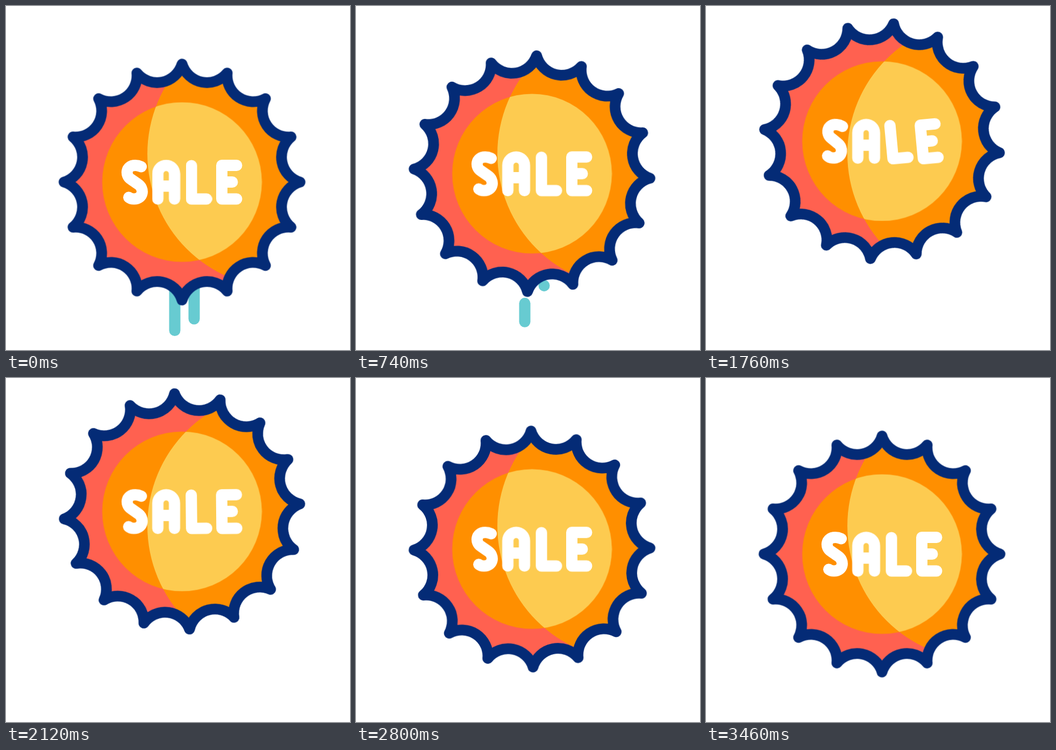
These frames come from a looping animation (640x640 px, 3600 ms). An HTML page:

```html
<!DOCTYPE html>
<html lang="en">
<head>
<meta charset="utf-8">
<title>Sale badge</title>
<style>
  html, body { margin: 0; width: 100%; height: 100%; overflow: hidden; background: #fff; }
  svg { display: block; width: 100vw; height: 100vh; }

  .coral { fill: #ff6150; }
  .orange { fill: #ff8f00; }
  .yellow { fill: #fdcb50; }
  .rim { fill: none; stroke: #042b76; stroke-width: 20; stroke-linejoin: round; }
  .text { fill: none; stroke: #fff; stroke-width: 21; stroke-linecap: round; stroke-linejoin: round; }
  .trail { fill: none; stroke: #67cbd1; stroke-width: 21; stroke-linecap: round; visibility: hidden; }

  .lift, .spin, .tilt, .trail { animation: 3600ms linear infinite; }
  .lift { animation-name: lift; }
  .spin { animation-name: spin; }
  .tilt { animation-name: tilt; }
  .long { animation-name: long; }
  .short { animation-name: short; }

  @keyframes lift {
    0% { transform: translateY(0); animation-timing-function: ease-in-out; }
    12.5% { transform: translateY(24px); animation-timing-function: cubic-bezier(.42, 0, .5, 1); }
    31.67% { transform: translateY(-72.5px); }
    56.94% { transform: translateY(-77.7px); animation-timing-function: ease-in-out; }
    63.89% { transform: translateY(-87px); animation-timing-function: cubic-bezier(.333, 0, .667, .333); }
    78.61% { transform: translateY(0); animation-timing-function: cubic-bezier(.333, .667, .667, 1); }
    80.28% { transform: translateY(10px); animation-timing-function: ease-in-out; }
    96.2%, 100% { transform: translateY(0); }
  }
  @keyframes spin {
    0%, 15.56% { transform: rotate(0deg); animation-timing-function: cubic-bezier(.333, 0, .667, .18); }
    20.56% { transform: rotate(2.2deg); animation-timing-function: cubic-bezier(.333, .19, .667, .727); }
    36.67% { transform: rotate(32.6deg); }
    48.89% { transform: rotate(50.6deg); }
    68.33% { transform: rotate(76.3deg); animation-timing-function: cubic-bezier(.333, .34, .667, .9); }
    77.78% { transform: rotate(89.5deg); animation-timing-function: ease-out; }
    80.56%, 100% { transform: rotate(90deg); }
  }
  @keyframes tilt {
    0%, 25% { transform: rotate(0deg); animation-timing-function: ease-in-out; }
    36.67% { transform: rotate(var(--tilt)); animation-timing-function: ease-in-out; }
    63.89%, 100% { transform: rotate(0deg); }
  }
  @keyframes long {
    0% { visibility: hidden; }
    17.2%, 17.22% { visibility: visible; stroke-dasharray: 0 300; stroke-dashoffset: 0; }
    20.56% { stroke-dasharray: 34 300; stroke-dashoffset: -33.5; }
    21.94% { stroke-dasharray: 30 300; stroke-dashoffset: -52; }
    24.44% { visibility: visible; stroke-dasharray: 0 300; stroke-dashoffset: -82; }
    24.45%, 100% { visibility: hidden; stroke-dashoffset: -82; stroke-dasharray: 0 300; }
  }
  @keyframes short {
    0% { visibility: hidden; }
    20.2%, 20.56% { visibility: visible; stroke-dasharray: 0 300; stroke-dashoffset: 0; }
    24% { stroke-dasharray: 35 300; stroke-dashoffset: -25; }
    26.67% { visibility: visible; stroke-dasharray: 0 300; stroke-dashoffset: -60; }
    26.68%, 100% { visibility: hidden; stroke-dashoffset: -60; stroke-dasharray: 0 300; }
  }
</style>
</head>
<body>
<svg viewBox="-327.5 -327.5 640 640" role="img" aria-label="SALE">
  <defs>
    <path id="star"/>
    <circle id="disc" r="148.5"/>
    <clipPath id="light"><circle cx="185.5" cy="-52.5" r="250"/></clipPath>
  </defs>

  <path class="trail long" d="M-13.5 192v84"/>
  <path class="trail short" d="M22.5 192.5v62"/>

  <g class="lift">
    <use href="#star" class="spin coral"/>
    <use href="#disc" class="orange"/>
  </g>
  <g clip-path="url(#light)">
    <g class="lift">
      <use href="#star" class="spin orange"/>
      <use href="#disc" class="yellow"/>
    </g>
  </g>
  <g class="lift">
    <use href="#star" class="spin rim"/>
    <g class="text">
      <g transform="translate(-87.5 .5)"><path class="tilt" style="--tilt:8deg" d="M11.5-29Q6-31.5 .5-31.5C-18-31.5-18-12-8-6L5 3C18 11 16 31-2 31Q-8 31-11.5 28"/></g>
      <g transform="translate(-29.5 .5)"><path d="M-15.5 31V-16A15.5 15.5 0 0 1 15.5-16V31M-15.5 7H15.5"/></g>
      <g transform="translate(32 .5)"><path class="tilt" style="--tilt:-9deg" d="M-14.5-31V31H13.5"/></g>
      <g transform="translate(87.5 .5)"><path class="tilt" style="--tilt:-9deg" d="M14-31.5H-13.5V31H14M-13.5-.5H6"/></g>
    </g>
  </g>
</svg>
<script>
  // Sixteen tips joined by arcs that curve inwards
  const tips = 16, radius = 219.5, scoop = 48.6;
  const tip = i => {
    const a = i * 2 * Math.PI / tips;
    return `${(radius * Math.sin(a)).toFixed(2)} ${(-radius * Math.cos(a)).toFixed(2)}`;
  };
  let d = `M${tip(0)}`;
  for (let i = 1; i <= tips; i++) d += `A${scoop} ${scoop} 0 0 0 ${tip(i)}`;
  document.getElementById('star').setAttribute('d', d + 'Z');
</script>
</body>
</html>
```
